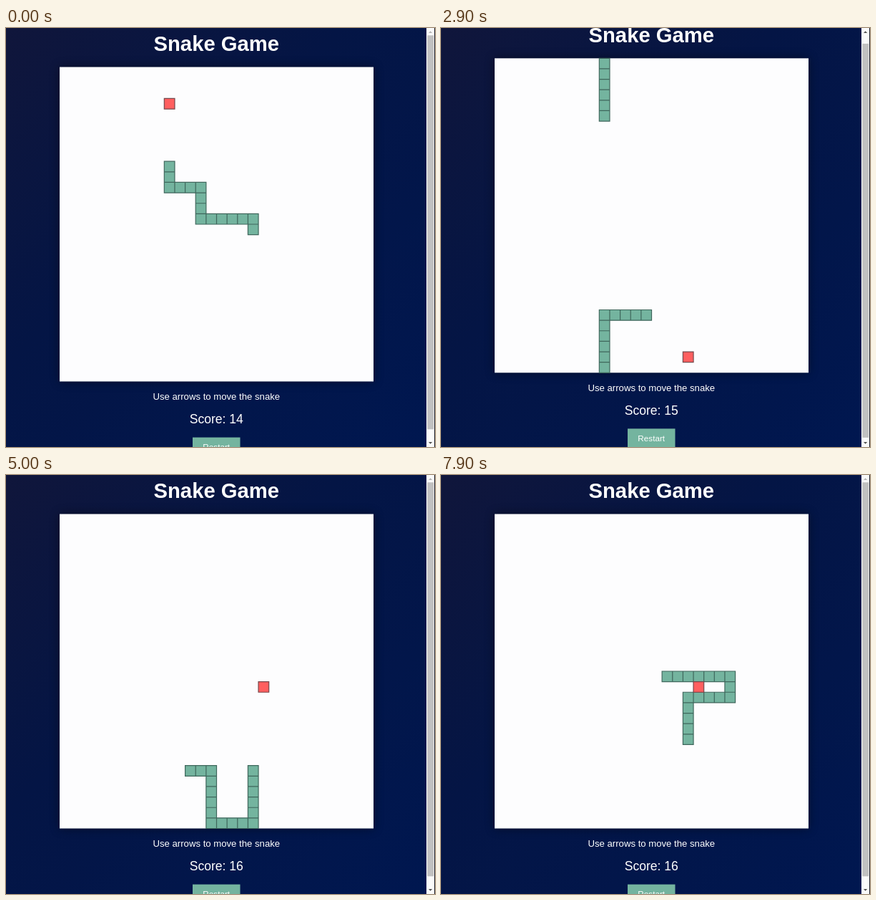
Animation, 600 px wide and 585 px high, one loop 8000 ms. Source, as an HTML page:

```html
<!DOCTYPE html>
<html lang="en">
<head>
<meta charset="utf-8">
<title>Snake Game</title>
<style>
  html, body { margin: 0; width: 100%; height: 100%; overflow: hidden; background: #001750; }
  svg { display: block; width: 600px; height: 585px; }
  text { font-family: "Liberation Sans", Arial, sans-serif; fill: #fff; text-anchor: middle; }
  .board { fill: #fdfdfe; filter: drop-shadow(0 0 7px rgba(0, 0, 0, .45)); }
  .snake { fill: #74b49f; stroke: #3f675c; stroke-width: 1.2; }
  .food { fill: #ff5f5f; stroke: #75474b; stroke-width: 1.2; }
</style>
</head>
<body>
<svg viewBox="0 0 600 585">
  <defs>
    <linearGradient id="night" gradientUnits="userSpaceOnUse" x1="0" y1="0" x2="588" y2="585">
      <stop offset="0" stop-color="#10163b"/>
      <stop offset=".4" stop-color="#041545"/>
      <stop offset="1" stop-color="#001750"/>
    </linearGradient>
  </defs>
  <rect width="600" height="585" fill="url(#night)"/>
  <g id="page">
    <text x="294.3" y="32" font-size="29.26" font-weight="bold">Snake Game</text>
    <rect class="board" x="75" y="54.5" width="439" height="439"/>
    <path id="snake" class="snake"/>
    <path id="food" class="food"/>
    <text x="294.3" y="518.8" font-size="13.17">Use arrows to move the snake</text>
    <text id="score" x="294.3" y="552.4" font-size="17.56"></text>
    <rect x="261" y="571.6" width="66.5" height="29" fill="#74b49f"/>
    <text x="294.2" y="589.2" font-size="11.7">Restart</text>
  </g>
  <rect x="588" width="11" height="585" fill="#fafafa"/>
  <rect x="599" width="1" height="585" fill="#20222c"/>
  <rect id="thumb" x="589.2" width="9" height="550" fill="#c1c1c1"/>
  <path id="arrowUp" d="M591 7 L593.6 4.2 L596.2 7Z"/>
  <path id="arrowDown" d="M591 578 L593.6 580.8 L596.2 578Z"/>
</svg>
<script>
const LOOP = 8000, FRAME = 100, STEP = 152, STEP_LEAD = 54;
const GRID = 30, CELL = 439 / GRID, LEFT = 75, TOP = 54.5;
const START_LENGTH = 15, START_SCORE = 14, MAX_SCROLL = 14.5;
const MEALS = [7, 30];
const FOODS = [[10, 3], [18, 28], [19, 16]];
const DIRECTIONS = { U: [0, -1], D: [0, 1], L: [-1, 0], R: [1, 0] };
const $ = id => document.getElementById(id);

// Every cell the head visits, beginning with the first tail cell.
const trail = [[18, 15]];
for (const run of 'U1 L5 U3 L3 U17 R4 D5 R4 U12 R4 U2 L6'.split(' ')) {
  const [dx, dy] = DIRECTIONS[run[0]];
  for (let i = 0; i < +run.slice(1); i++) {
    const [x, y] = trail[trail.length - 1];
    trail.push([(x + dx + GRID) % GRID, (y + dy + GRID) % GRID]);
  }
}

const square = ([x, y]) =>
  `M${LEFT + x * CELL} ${TOP + y * CELL}h${CELL}v${CELL}h${-CELL}z`;

function scrollAt(t) {
  if (t < 2900 || t >= 4400) return 0;
  if (t < 3000) return 12.2;
  return t < 4300 ? MAX_SCROLL : 6;
}

function draw(now) {
  const t = Math.floor(now % LOOP / FRAME) * FRAME;
  const step = Math.floor((t + STEP_LEAD) / STEP);
  const eaten = MEALS.filter(meal => step >= meal).length;
  const end = START_LENGTH + step;
  const scroll = scrollAt(t);

  $('snake').setAttribute('d', trail.slice(end - START_LENGTH - eaten, end).map(square).join(''));
  $('food').setAttribute('d', square(FOODS[eaten]));
  $('score').textContent = `Score: ${START_SCORE + eaten}`;
  $('page').setAttribute('transform', `translate(0 ${-scroll})`);
  $('thumb').setAttribute('y', 10.3 + scroll * .95);
  $('arrowUp').setAttribute('fill', scroll > 0 ? '#505050' : '#b5b5b5');
  $('arrowDown').setAttribute('fill', scroll < MAX_SCROLL ? '#505050' : '#b5b5b5');
}

const start = performance.now();
function tick() {
  draw(performance.now() - start);
  requestAnimationFrame(tick);
}
tick();
</script>
</body>
</html>
```
